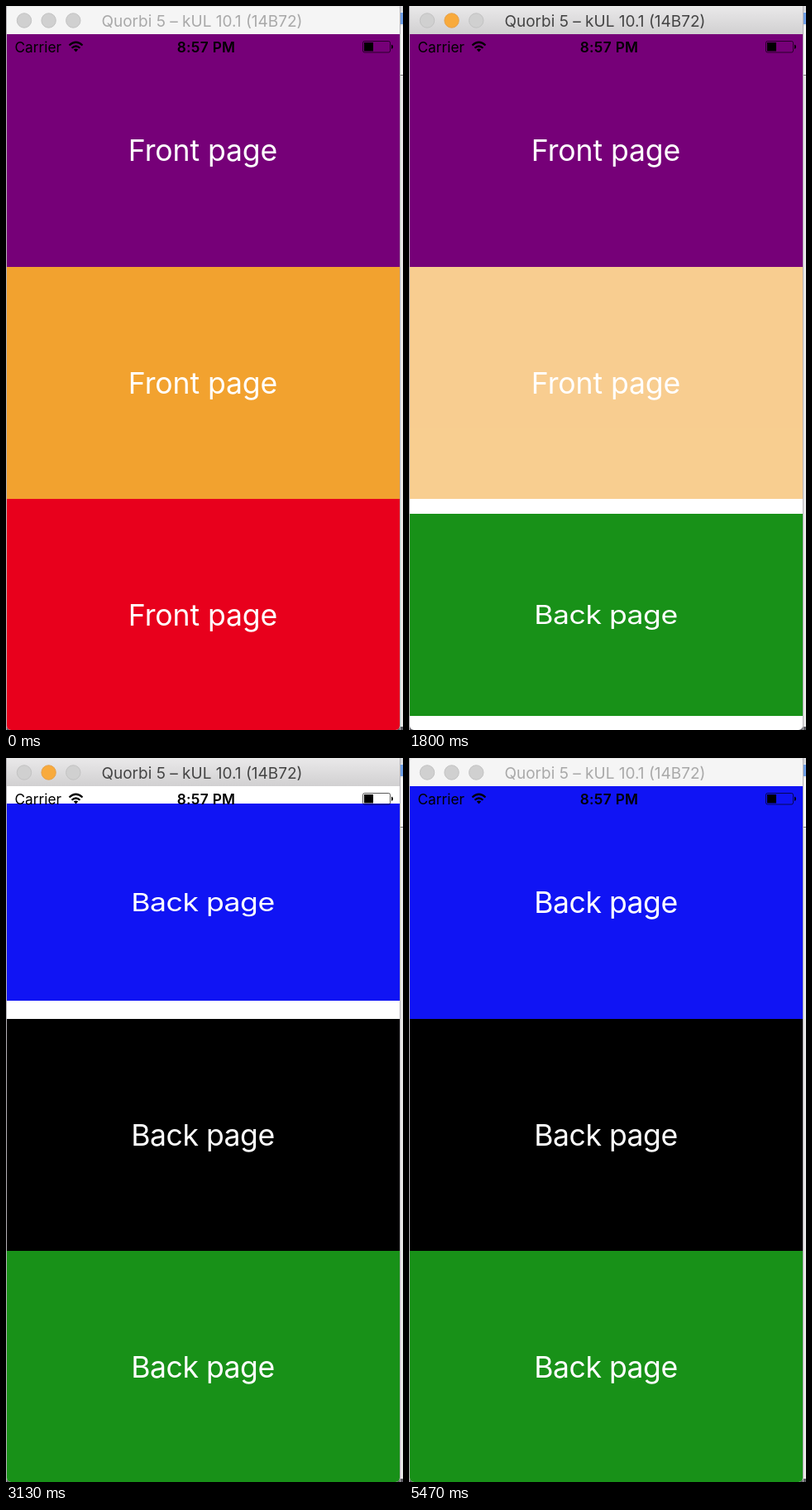
These frames come from a looping animation (480x874 px, 5.54 s). An HTML page:

```html
<!DOCTYPE html>
<html lang="en">
<head>
<meta charset="utf-8">
<title>Flip panels</title>
<style>
  html, body { margin: 0; width: 100%; height: 100%; overflow: hidden; background: #e9e9e9; }
  svg { display: block; width: 100vw; height: 100vh; }
  text { font-family: Inter, Roboto, sans-serif; }
  .label { font-size: 35.6px; letter-spacing: -.5px; fill: #fff; text-anchor: middle; }
  .front .label { letter-spacing: -.1px; }
  .status { font-size: 17.3px; }
  .title { font-size: 19px; text-anchor: middle; fill: #444; }
  .dot { fill: #d0d0d0; stroke: #c2c2c2; }
  .active .lit { fill: #f8aa3c; stroke: #e6a14a; }
  .inactive .title { fill: #a9a9a9; }
  .inactive .bar { fill: #f5f5f5; }
</style>
</head>
<body>
<svg viewBox="0 0 480 874">
  <defs>
    <linearGradient id="chrome" x2="0" y2="1">
      <stop stop-color="#e9e8e9"/><stop offset="1" stop-color="#d1d0d1"/>
    </linearGradient>
    <clipPath id="window"><rect x="1" y="-10" width="475" height="884" rx="5"/></clipPath>
  </defs>
  <rect width="480" height="874" fill="#e9e9e9"/>
  <path d="M476 0h4v7h-4z" fill="#d9d9dc"/>
  <path d="M476 8h4v14h-4z" fill="#6f9fe6"/>
  <path d="M476 24h4v59h-4z" fill="#f6f6f6"/>
  <path d="M476 83.5h4" stroke="#777"/>
  <path d="M0 868h6v6H0zM471 870h9v4h-9z" fill="#5c5c62"/>
  <path d="M.5 0v874M476.5 0v874" stroke="#b3b0b5"/>

  <g clip-path="url(#window)">
    <rect x="1" y="34" width="475" height="840" fill="#fff"/>
    <g id="panels"></g>
  </g>

  <g id="chromeBar" class="inactive">
    <path class="bar" d="M1 34V5q0-4 4-4h467q4 0 4 4v29z" fill="url(#chrome)"/>
    <circle class="dot" cx="22" cy="17.5" r="8.7"/>
    <circle class="dot lit" cx="51.6" cy="17.5" r="8.7"/>
    <circle class="dot" cx="81.3" cy="17.5" r="8.7"/>
    <text class="title" x="237" y="25">Quorbi 5 – kUL 10.1 (14B72)</text>
  </g>

  <g>
    <text class="status" x="10.5" y="55.5">Carrier</text>
    <text class="status" x="242" y="55.5" text-anchor="middle" font-weight="600" letter-spacing=".3">8:57 PM</text>
    <g fill="none" stroke="#000" stroke-width="2.2">
      <path d="M76.5 47.5q8-7.5 16 0M79.5 50.8q5-4.6 10 0"/>
      <path d="M84.5 55.5l-2.7-2.9q2.7-2.2 5.4 0z" fill="#000" stroke="none"/>
    </g>
    <rect x="431.5" y="42.5" width="33" height="13.5" rx="2" fill="none" stroke="#000" stroke-opacity=".65"/>
    <path d="M433 44h11v10.5h-11zM466 46.5q2 .5 2 2.8t-2 2.8z"/>
  </g>
</svg>
<script>
const LOOP = 5540, FPS = 15, HEIGHT = 280.6, SWING = 0.6;
const NS = "http://www.w3.org/2000/svg";

// start: when the back begins to swing in (s); damping: decay of the swing
const panels = [
  { y: 174.4, front: "#760078", back: "#1014f4", start: 2.935, damping: 1.57 },
  { y: 455, front: "#f2a22f", back: "#000000", start: 2.112, damping: 2.57 },
  { y: 735.1, front: "#e8001c", back: "#189118", start: 1.234, damping: 1.86 }
];

function add(parent, tag, attrs, content = "") {
  const node = document.createElementNS(NS, tag);
  for (const key in attrs) node.setAttribute(key, attrs[key]);
  node.textContent = content;
  return parent.appendChild(node);
}

function addFace(side, color, label) {
  const face = add(document.getElementById("panels"), "g", { class: side });
  add(face, "rect", {
    x: 1, y: -HEIGHT / 2, width: 475, height: HEIGHT, fill: color, "shape-rendering": "crispEdges"
  });
  add(face, "text", { class: "label", x: 238, y: 12.6 }, label);
  return face;
}

for (const panel of panels) {
  panel.backFace = addFace("back", panel.back, "Back page");
  panel.frontFace = addFace("front", panel.front, "Front page");
}

function pose(face, y, scale, opacity) {
  face.setAttribute("transform", `translate(0 ${y}) scale(1 ${scale})`);
  face.setAttribute("opacity", opacity);
}

const clamp = v => Math.max(0, Math.min(1, v));

// A damped swing about the horizontal axis, seen without perspective
function swingScale(t, damping) {
  const angle = Math.PI / 2 * Math.exp(-damping * t) * Math.cos(2 * Math.PI * t / SWING);
  return Math.cos(angle);
}

function draw(seconds) {
  for (const { y, start, damping, frontFace, backFace } of panels) {
    const t = seconds - start;
    pose(frontFace, y, 1, 1 - clamp((t + 0.5) / 0.4));
    pose(backFace, y, t > 0 ? swingScale(t, damping) : 0, t < 0 ? 0 : t < 0.15 ? 0.93 : 1);
  }
  const active = seconds > 0.6 && seconds < 5;
  document.getElementById("chromeBar").setAttribute("class", active ? "active" : "inactive");
}

const origin = performance.now();
function tick() {
  const ms = (performance.now() - origin) % LOOP;
  draw(Math.floor((ms + 4) * FPS / 1000) / FPS);
  requestAnimationFrame(tick);
}
tick();
</script>
</body>
</html>
```
